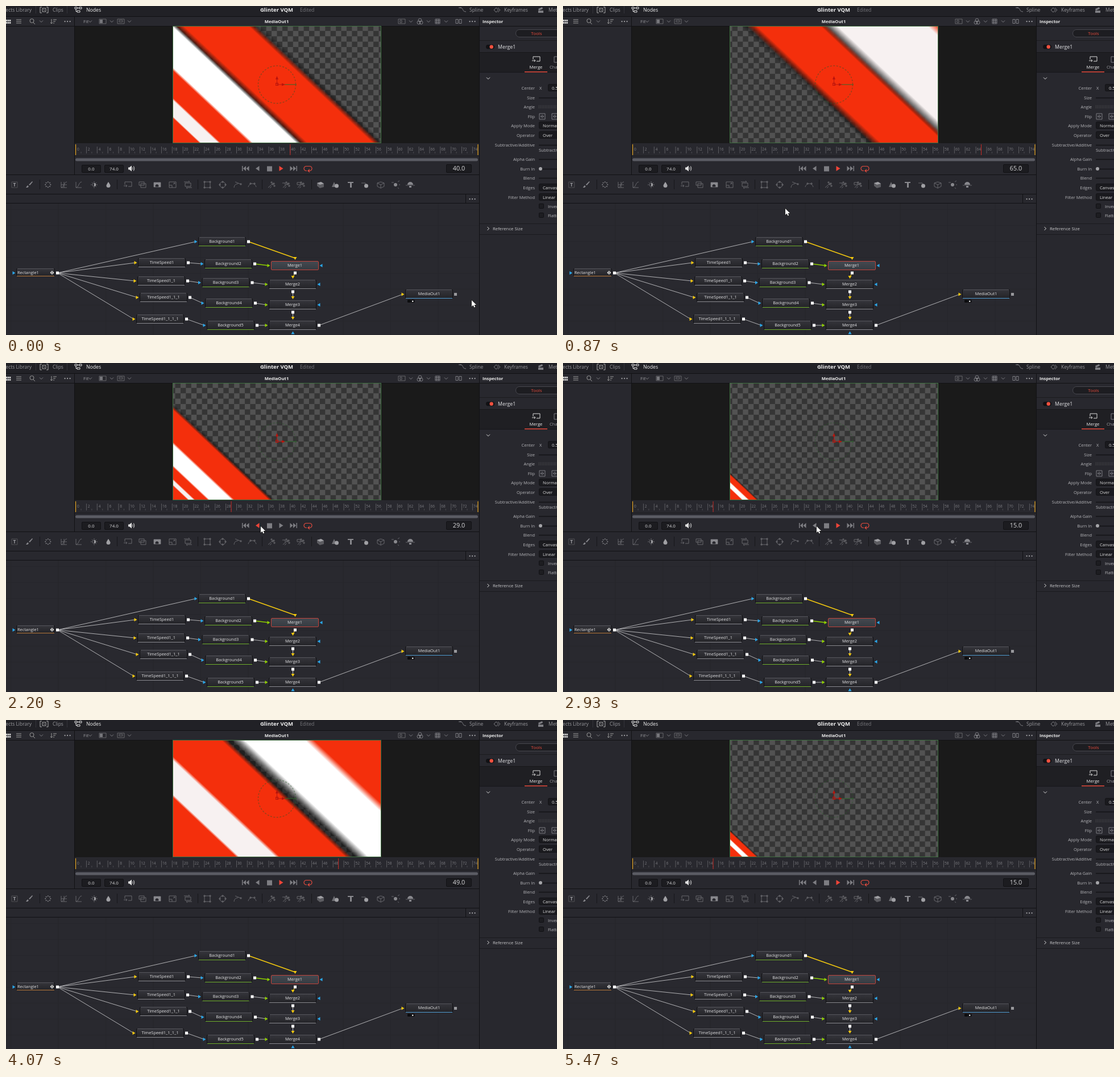
Animation of 969 by 578 pixels, one loop 5540 ms. Source, as an HTML page with a canvas:

```html
<!DOCTYPE html>
<html>
<head>
<meta charset="utf-8">
<style>
html, body { margin: 0; width: 100%; height: 100%; overflow: hidden; background: #28282e; }
canvas { display: block; }
</style>
</head>
<body>
<canvas id="stage" width="969" height="578"></canvas>
<script>
const ctx = document.getElementById('stage').getContext('2d');
const LOOP = 5540, STEP = 200 / 3, STEPS = 83;
const RED = '#e64b3d', GRAY = '#7d7d82', LIGHT = '#c4c4c6', PANEL = '#28282e', BLACK = '#111114';
const YELLOW = '#f2c80f', GREEN = '#8fcf00', BLUE = '#2ba6e8';
const VIEW = { x: 294, y: 36, w: 365, h: 204 };

// ---------- helpers ----------
const rect = (x, y, w, h, color) => { ctx.fillStyle = color; ctx.fillRect(x, y, w, h); };
function box(x, y, w, h, r, fill, stroke, width = 1) {
  ctx.beginPath();
  ctx.roundRect(x, y, w, h, r);
  if (fill) { ctx.fillStyle = fill; ctx.fill(); }
  if (stroke) { ctx.strokeStyle = stroke; ctx.lineWidth = width; ctx.stroke(); }
}
function text(s, x, y, size = 7.6, color = LIGHT, align = 'left', weight = 400) {
  ctx.font = `${weight} ${size}px "Open Sans", "Noto Sans", sans-serif`;
  ctx.textAlign = align;
  ctx.textBaseline = 'alphabetic';
  ctx.fillStyle = color;
  ctx.fillText(s, x, y + size * 0.36);
}
function line(x1, y1, x2, y2, color, width = 1) {
  ctx.strokeStyle = color;
  ctx.lineWidth = width;
  ctx.beginPath();
  ctx.moveTo(x1, y1);
  ctx.lineTo(x2, y2);
  ctx.stroke();
}
function icon(d, x, y, color = GRAY, filled = false, width = 1) {
  const path = new Path2D(d);
  ctx.save();
  ctx.translate(x, y);
  ctx.fillStyle = ctx.strokeStyle = color;
  ctx.lineWidth = width;
  filled ? ctx.fill(path) : ctx.stroke(path);
  ctx.restore();
}
const chevron = (x, y, color = GRAY) => icon('M-3 -1.5L0 1.5L3 -1.5', x, y, color);
const dots = (x, y) => [-4.5, 0, 4.5].forEach(d => box(x + d - 1, y - 1, 2.2, 2.2, 1, '#a0a0a4'));

// Piecewise linear curve through [input, output] pairs.
function curve(points, x) {
  if (x <= points[0][0]) return points[0][1];
  for (let i = 1; i < points.length; i++) {
    const [x0, y0] = points[i - 1], [x1, y1] = points[i];
    if (x <= x1) return y0 + (y1 - y0) * (x - x0) / (x1 - x0);
  }
  return points[points.length - 1][1];
}

// ---------- motion ----------
const RATE = 1.965;
const reversing = k => k >= 33 && k < 43;
function counter(k) {
  if (k <= 33) return Math.floor(40 + RATE * k) % 75;
  if (k < 42) return Math.floor(29.5 - RATE * (k - 33));
  return Math.floor(33.65 + RATE * (k - 53)) % 75;
}
const CURSOR_X = [[0, 819], [2, 745], [4, 600], [6, 440], [8, 308], [9, 330], [17, 452], [21, 452], [33, 448], [44, 446], [53, 430], [54, 415], [57, 270]];
const CURSOR_Y = [[0, 517], [2, 508], [6, 470], [8, 453], [9, 425], [17, 287], [44, 287], [52, 302], [53, 310], [54, 355], [57, 551]];
const cursorAt = k => k > 57 ? null : { x: curve(CURSOR_X, k), y: curve(CURSOR_Y, k) };

// Stripe edges, as distance along the bottom of the picture from its left corner.
const PICTURE_TIME = [[0, -4], [6, 0], [15, 12], [29, 29], [40, 40], [49, 51], [55, 58], [74, 79]];
const FRONT = [[-4, 16], [-2, 21], [0, 25], [5, 32], [8, 37], [12, 47], [15, 62], [19, 81], [22, 105], [26, 137], [29, 171], [33, 220], [37, 308], [40, 357], [44, 457], [51, 660]];
const TAIL = [[23, -20], [30, 46], [37, 150], [44, 332], [51, 438], [58, 560], [65, 660]];
const LAYERS = ['244,47,12', '255,255,255', '244,47,12', '247,241,241', '244,47,12'];

// ---------- viewer ----------
function band(rgb, alpha, tail, tailBlur, front, frontBlur) {
  const span = 640, slope = 0.94, { x, y, w, h } = VIEW;
  const reach = span / (1 + 1 / slope ** 2);
  const g = ctx.createLinearGradient(x, y + h, x + reach, y + h - reach / slope);
  const stop = (u, a) => g.addColorStop(Math.min(1, Math.max(0, u / span)), `rgba(${rgb},${a})`);
  stop(tail - tailBlur, 0);
  stop(tail + tailBlur, alpha);
  stop(front - frontBlur, alpha);
  stop(front + frontBlur, 0);
  rect(x, y, w, h, g);
}

function viewer(frame) {
  const { x, y, w, h } = VIEW, cell = 9.42;
  rect(121, 36, 711, 205, '#1a1a1a');
  ctx.save();
  ctx.beginPath();
  ctx.rect(x, y, w, h);
  ctx.clip();
  rect(x, y, w, h, '#353535');
  // Checkerboard centred on the picture.
  for (let r = -11; r < 11; r++)
    for (let c = -20; c < 20; c++)
      if ((r + c) % 2) rect(476.5 + c * cell, 138 + r * cell, cell, cell, '#525252');

  const time = curve(PICTURE_TIME, frame);
  const stripes = LAYERS.map((rgb, i) => {
    const age = time - 7 * i, front = curve(FRONT, age), tail = curve(TAIL, age);
    return { rgb, age, front, tail, fb: 1 + front / 65, tb: 2 + Math.max(0, tail) / 35 };
  }).filter(s => s.age >= -4);
  stripes.forEach(s => band('0,0,0', 0.7, s.tail - s.tb, s.tb, s.front + s.fb, s.fb * 1.5));
  stripes.forEach(s => band(s.rgb, 1, s.tail, s.tb, s.front, s.fb));
  ctx.restore();
  ctx.strokeStyle = '#3f7040';
  ctx.lineWidth = 1;
  ctx.strokeRect(x - 0.5, y - 0.5, w + 1, h + 1);

  ctx.setLineDash([3, 2.5]);
  ctx.strokeStyle = 'rgba(40,85,40,.45)';
  ctx.lineWidth = 1.5;
  ctx.beginPath();
  ctx.arc(476.5, 138, 33, 0, 7);
  ctx.stroke();
  ctx.setLineDash([]);
  line(490, 138, 511, 138, '#2c6b2c');
  line(476.5, 138, 476.5, 126, '#b8140c');
  line(476.5, 138, 488, 138, '#b8140c');
  icon('M-2.5 3L0 -3L2.5 3Z', 476.5, 126, '#b8140c', true);
  icon('M-3 -2.5L3 0L-3 2.5Z', 488, 138, '#b8140c', true);
  ctx.strokeStyle = '#b8140c';
  ctx.strokeRect(474.5, 135.5, 4, 4);
}

function ruler(frame) {
  rect(121, 241, 711, 55, PANEL);
  const tick = f => 122.6 + 9.43 * f;
  for (let f = 0; f <= 74; f++) {
    if (f % 2) line(tick(f), 256, tick(f), 259, '#4b4b50');
    else {
      line(tick(f), 247, tick(f), 259, '#5c5c61');
      text(f, tick(f) + (f < 10 ? 4.2 : 5.2), 252, 6.6, '#7c7c80', 'center');
    }
  }
  line(122.5, 243, 122.5, 262, '#d79a20', 1.3);
  line(830, 243, 830, 262, '#d79a20', 1.3);
  line(tick(frame), 243, tick(frame), 262, '#c92a25');
  line(121, 263.5, 832, 263.5, '#1c1c20');
  box(122, 267.5, 708, 5, 2.5, '#5b5c64');
}

function transport(frame, k) {
  const field = (x, y, w, h, s, size) => {
    box(x + 0.5, y + 0.5, w, h, 1.5, '#1c1c20', '#121215');
    text(s, x + w / 2 + 0.5, y + h / 2 + 0.5, size, '#d8d8da', 'center');
  };
  field(133, 279, 33, 13, '0.0', 8);
  field(173, 279, 33, 13, '74.0', 8);
  field(774, 278, 44, 14, frame.toFixed(1), 10.8);
  icon('M-5 -2H-3L1 -5V5L-3 2H-5Z', 220, 285.5, '#ddd', true);
  icon('M2.5 -2Q4 0 2.5 2M4.5 -4Q7 0 4.5 4', 220, 285.5, '#ddd');
  const back = reversing(k);
  icon('M-6 -4.5H-4.5V4.5H-6ZM1 -4.5V4.5L-4 0ZM6.5 -4.5V4.5L1.5 0Z', 421, 285.5, GRAY, true);
  icon('M3 -4.5V4.5L-3.5 0Z', 442.5, 285.5, back ? '#f04438' : GRAY, true);
  rect(459, 281.5, 9, 9, GRAY);
  icon('M-3 -4.5V4.5L4 0Z', 483.5, 285.5, back ? GRAY : '#f04438', true);
  icon('M6 -4.5H4.5V4.5H6ZM-1 -4.5V4.5L4 0ZM-6.5 -4.5V4.5L-1.5 0Z', 506, 285.5, GRAY, true);
  icon('M-2 4H-3A4 4 0 0 1 -3 -4H3A4 4 0 0 1 3 4H1M3 1.5L0 4L3 6.5', 531, 285.5, '#e24b3f', false, 1.2);
}

// ---------- panels ----------
const MERGE_ICON = 'M-5 0V-5H7V3H1M-7 2H-1M-3 0L-1 2L-3 4';
const FRAME_ICON = 'M-6 -4H6V4H-6Z';

function topBars() {
  rect(0, 0, 969, 18, '#212126');
  rect(0, 18, 969, 18, PANEL);
  text('Effects Library', 45, 7, 8.5, '#98989c', 'right');
  icon('M-7 -5H-4M-7 -5V5H-4M7 -5H4M7 -5V5H4M-3 -3H3V3H-3ZM-1 -1L1 1', 67, 7, '#aaa');
  text('Clips', 82, 7, 8.5, '#98989c');
  icon('M-6 -4H-2V-1H-6ZM2 -4H6V-1H2ZM-2 2H3V5H-2ZM-2 -2.5H2M-4 -1V3.5H-2', 127, 6, '#ddd');
  text('Nodes', 141, 7, 8.7, '#f0f0f0');
  text('Glinter VQM', 476, 7, 9.5, '#f0f0f0', 'center', 700);
  text('Edited', 517, 7, 8.6, '#77777c');
  icon('M-7 -3H-2M-5 -3C3 -3 -2 4 6 4', 803, 6);
  text('Spline', 815, 7, 8.5, '#98989c');
  icon('M-6 0L-2 -4L2 0L-2 4ZM1 -4L5 0L1 4', 864, 7);
  text('Keyframes', 876, 7, 8.5, '#98989c');
  icon('M-5 -2L2 -5L3 -2L-4 1ZM-5 1H4V5H-5Z', 941, 7, GRAY, true);
  text('Metadata', 954, 7, 8.5, '#98989c');
  for (const x of [52.5, 107.5]) line(x, 0, x, 13, '#34343a');
  line(0, 18.5, 969, 18.5, BLACK);

  for (const x of [0, 3, 6]) for (const y of [24, 28]) rect(x, y, 2.4, 3, '#ccc');
  icon('M-4 -3H5M-4 0H5M-4 3H5', 22, 27, '#999');
  icon('M2 2L5 5M3 -1A3.5 3.5 0 1 1 -4 -1A3.5 3.5 0 1 1 3 -1', 46, 27, '#999');
  chevron(62, 27);
  icon('M-3 -4V4M-5 2L-3 4L-1 2M0 -3H6M0 0H4M0 3H2', 83, 27, '#999');
  dots(108, 27);
  text('Fit', 136, 27, 8, '#98989c');
  chevron(148, 27);
  icon(FRAME_ICON, 170, 27, '#66666b');
  rect(165, 24, 5, 6, '#77777c');
  chevron(186, 27);
  icon('M-6 -4H6V4H-6ZM-3 -2H3V1H-3Z', 202, 27, '#66666b');
  chevron(217, 27);
  text('MediaOut1', 476, 27, 7.7, '#eee', 'center', 700);
  icon('M-6 -4H6V4H-6ZM-3 -2H0V2H-3Z', 696, 27, '#66666b');
  chevron(712, 27);
  icon('M3 -2A3 3 0 1 1 -3 -2A3 3 0 1 1 3 -2M1 2A3 3 0 1 1 -5 2A3 3 0 1 1 1 2M5 2A3 3 0 1 1 -1 2A3 3 0 1 1 5 2', 728, 27);
  chevron(743, 27);
  icon('M-4 -4H4V4H-4ZM-1.5 -4V4M1.5 -4V4M-4 -1.5H4M-4 1.5H4', 759, 27);
  chevron(774, 27);
  icon('M-5 -3.5H-1V3.5H-5ZM1 -3.5H5V3.5H1Z', 796, 27);
  dots(820, 27);
  line(0, 35.5, 969, 35.5, BLACK);
  line(120.5, 18, 120.5, 296, BLACK);
}

function toolbar() {
  rect(0, 296, 832, 51, PANEL);
  for (const y of [296.5, 330.5, 346.5]) line(0, y, 832, y, BLACK);
  for (const x of [59.5, 195.5, 337.5, 450.5, 537.5]) line(x, 305, x, 322, '#17171a');
  const dim = '#6e6e73', mid = '#88888d', bright = '#a0a0a4';
  const draw = (x, d, filled, color = dim) => icon(d, x, 314, color, filled, 0.9);
  const ring = 'M5 0A5 5 0 1 1 -5 0A5 5 0 1 1 5 0';
  const spark = 'M-6 5L1 -1M-3 6L0 3M-1 -5h2v2h-2zM3 -3h2v2h-2zM4 1h2v2h-2zM1 -2h2v2h-2z';
  icon('M-5 -5H5V5H-5Z', 15, 314, '#505055');
  text('T', 15, 314, 8.5, bright, 'center', 700);
  draw(41, 'M-6 5L-3 1L-1 3L-3 5ZM-1 0L5 -6L6 -5L1 1Z', true, mid);
  for (let i = 0; i < 8; i++) {
    const a = i * Math.PI / 4;
    rect(73 + 4.5 * Math.cos(a), 313 + 4.5 * Math.sin(a), 1.7, 1.7, mid);
  }
  draw(102, 'M-5 -5V5H5M-5 0H5M0 -5V5M-5 5C1 4 -1 -4 5 -5');
  draw(128, 'M-5 -5V5H5M-5 5C1 4 -1 -4 5 -5');
  draw(155, 'M3 0A3 3 0 1 1 -3 0A3 3 0 1 1 3 0M0 -6V-4M0 4V6M-6 0H-4M4 0H6M-4 -4L-3 -3M3 3L4 4M4 -4L3 -3');
  draw(155, 'M0 -3A3 3 0 0 1 0 3Z', true, bright);
  draw(180, 'M0 -5Q3.5 0 3.5 1.5A3.5 3.5 0 0 1 -3.5 1.5Q-3.5 0 0 -5Z', true, bright);
  draw(214, MERGE_ICON);
  draw(240, 'M-6 -5H3V1H-6ZM-3 -2H6V5H-3Z');
  draw(266, FRAME_ICON);
  draw(266, 'M-6 -4H6V4H2A3 3 0 1 0 -3 4H-6Z', true, mid);
  draw(293, 'M-6 -5H6V5H-6ZM-6 1H-1V5M1 -1L4 -3M2 -3H4V-1');
  draw(320, 'M-5 -3H5V3H-5ZM-7 -5H3M1 -7L3 -5M7 5H-3M-1 7L-3 5');
  draw(354, 'M-5 -5H5V5H-5ZM-6 -6h2v2h-2zM4 -6h2v2h-2zM-6 4h2v2h-2zM4 4h2v2h-2z');
  draw(381, ring + 'M-1 -6h2v2h-2zM-1 4h2v2h-2zM-6 -1h2v2h-2zM4 -1h2v2h-2z');
  draw(407, 'M-6 5C-5 -3 0 0 2 -3M-4 -5L6 -1M5 -2h2v2h-2z');
  draw(433, 'M-7 4C-5 -4 5 -4 7 4M-4 -3h2v2h-2zM3 -3h2v2h-2z');
  for (const x of [467, 493, 519]) draw(x, spark);
  draw(493, 'M-7 -3H-2V1');
  draw(519, 'M-7 -4H-1V0H-7Z');
  draw(553, 'M-6 -3L1 -5L6 -2V4L-1 6L-6 2Z', true, '#5c5c61');
  draw(553, 'M-6 -3L1 -5L6 -2L-1 0Z', true, bright);
  draw(579, 'M-6 4L-2 -5L2 4Z', true, dim);
  draw(579, 'M6 2A3.5 3.5 0 1 1 -1 2A3.5 3.5 0 1 1 6 2', true, bright);
  draw(606, 'M-5 -5H5V-3H2V5H-1V-3H-5Z', true, mid);
  draw(632, 'M-7 -3H0V1');
  draw(632, 'M5 2A3.5 3.5 0 1 1 -2 2A3.5 3.5 0 1 1 5 2', true, bright);
  draw(659, 'M-6 -3L0 -5L6 -3V3L0 6L-6 3ZM-6 -3L0 0L6 -3M0 0V6');
  draw(685, 'M-7 -4H-3M4 -5L7 -7M6 0H8M4 5L6 7');
  draw(685, 'M3 0A3 3 0 1 1 -3 0A3 3 0 1 1 3 0', true, mid);
  draw(711, 'M-5 0A5 5 0 0 1 5 0ZM-2 2H2V5H-2Z', true, mid);
  draw(711, 'M-8 1H8');
  dots(820, 339);
  line(808.5, 331, 808.5, 346, BLACK);
}

function inspector() {
  rect(833, 36, 136, 542, PANEL);
  rect(833, 82, 136, 35, '#1f1f23');
  text('Inspector', 838, 27, 7.7, '#eee', 'left', 700);
  box(896.5, 41.5, 90, 13, 6.5, '#1d1d21', '#47474d');
  text('Tools', 933, 48, 8, RED, 'center');
  line(833, 60.5, 969, 60.5, '#1b1b1f');
  box(844, 68, 15, 7.5, 3.7, '#111114');
  box(850.5, 68.5, 6.5, 6.5, 3.3, '#f0513f');
  text('Merge1', 865, 72, 8.8, '#e4e4e6');
  icon(MERGE_ICON, 932, 94, '#ddd');
  text('Merge', 932, 107, 7.7, '#eee', 'center');
  icon('M-3 -5V5H3M-3 -5H3', 967, 94);
  text('Channels', 956, 107, 7.7, '#98989c');
  line(833, 81.5, 969, 81.5, '#17171a');
  line(833, 116.5, 969, 116.5, '#17171a');
  rect(912, 115, 40, 1.5, RED);
  chevron(848, 127, '#ddd');
  const rows = { Center: 144, Size: 161, Angle: 177, Flip: 194, 'Apply Mode': 210, Operator: 227,
    'Subtractive/Additive': 244, 'Alpha Gain': 269, 'Burn In': 286, Blend: 302, Edges: 319, 'Filter Method': 336 };
  for (const name in rows) text(name, 930, rows[name], 7.5, '#b4b4b8', 'right');
  const field = (s, x, y) => {
    box(x + 0.5, y - 6.5, 60, 12, 2, '#1a1a1e', '#131316');
    text(s, x + 7, y, 7.6, '#ddd');
  };
  text('X', 938, 144, 7.5, '#b4b4b8');
  field('0.5', 953, 144);
  field('Normal', 937, 210);
  field('Over', 937, 227);
  field('Canvas', 937, 319);
  field('Linear', 937, 336);
  text('Subtractive', 937, 253, 7.5, '#b4b4b8');
  for (const y of [161, 244, 269, 286, 302]) line(937, y + 0.5, 969, y + 0.5, '#131316', 1.5);
  for (let x = 937; x < 969; x += 2.5) line(x, 174, x, 180, '#3c3c41');
  box(937, 283, 6, 6, 3, '#a5a5a9');
  for (const x of [943, 965]) icon('M-5 -5H5V5H-5ZM0 -3V3M-3 -1L-1 0L-3 1M3 -1L1 0L3 1', x, 194);
  [['Invert', 352], ['Flatten', 368]].forEach(([s, y]) => {
    box(937.5, y - 4.5, 8, 8, 1, '#1d1d21', '#101013');
    text(s, 953, y, 7.5, '#b4b4b8');
  });
  line(833, 382.5, 969, 382.5, '#1a1a1e');
  icon('M-1.5 -3L1.5 0L-1.5 3', 848, 391, '#ddd');
  text('Reference Size', 856, 391, 7.8, '#c8c8ca');
  line(833, 401.5, 969, 401.5, '#1a1a1e');
  line(832.5, 18, 832.5, 578, BLACK);
}

// ---------- node graph ----------
const node = (name, x, y, accent, w = 84) => ({ name, x, y, accent, w });
const source = node('Rectangle1', 18, 469, '#b9793a', 68);
const speeds = [[232, 451], [231, 483], [235, 512], [229, 550]]
  .map(([x, y], i) => node('TimeSpeed1' + '_1'.repeat(i), x, y, '#8a8a90'));
const backgrounds = [[338, 414], [349, 453], [344.5, 486], [350, 522], [353, 561]]
  .map(([x, y], i) => node('Background' + (i + 1), x, y, '#6fae2c'));
const merges = [[466, 456], [462, 489], [462, 525], [462, 561]]
  .map(([x, y], i) => node('Merge' + (i + 1), x, y, '#8a8a90'));
const output = node('MediaOut1', 702, 506.5, '#4f9bd0');
const nodes = [source, ...speeds, ...backgrounds, ...merges, output];
const selected = merges[0];
merges.slice(0, 3).forEach(m => m.below = true);

const links = [{ from: source, to: backgrounds[0], color: BLUE }];
speeds.forEach((s, i) => links.push(
  { from: source, to: s, color: YELLOW },
  { from: s, to: backgrounds[i + 1], color: BLUE },
  { from: backgrounds[i + 1], to: merges[i], color: GREEN }));
[backgrounds[0], ...merges.slice(0, 3)].forEach((n, i) =>
  links.push({ from: n, to: merges[i], color: YELLOW, top: true }));
links.push({ from: merges[3], to: output, color: YELLOW });

const outlet = n => n.below ? [n.x + 42.5, n.y + 13] : [n.x + n.w + 4.5, n.y];
const inlet = l => l.top ? [l.to.x + 42.5, l.to.y - 13] : [l.to.x - 4.5, l.to.y];

function drawNode(n, hovered) {
  const { x, y, w } = n, h = n === source ? 13 : 15, top = Math.floor(y) - 7.5;
  const g = ctx.createLinearGradient(0, top, 0, top + h);
  g.addColorStop(0, n === selected ? '#444950' : '#35353b');
  g.addColorStop(1, n === selected ? '#363b41' : '#242428');
  box(x + 0.5, top, w - 1, h, 1.5, g, n === selected ? '#c2433b' : '#101013');
  if (n !== selected) {
    line(x + 2, top, x + w - 2, top, '#55555b');
    line(x + 1, top + h, x + w - 1, top + h, n.accent);
  }
  if (n === source) {
    text(n.name, 20, y - 1, 7.4, '#e2e2e4');
    icon('M0 -3.5L3.5 0L0 3.5L-3.5 0Z', 81, 468.5, '#ddd', true);
    line(81, 466.5, 81, 470.5, '#222');
  } else text(n.name, x + w / 2, y - 1, 7.4, '#e2e2e4', 'center');
  if (hovered || n === output) {
    box(x + 4, y + 9.5, 6, 5, 1, '#0c0c0e');
    box(x + 10.5, y + 9.5, 6, 5, 1, '#0c0c0e');
    if (n === output) box(x + 12, y + 11, 2.5, 2.5, 1.2, '#fff');
  }
}

function graph(cursor) {
  rect(0, 347, 832, 231, '#29292f');
  for (let x = 8; x < 832; x += 83.5) line(x + 0.5, 347, x + 0.5, 578, '#26262b');
  for (let y = 357; y < 578; y += 28) line(0, y + 0.5, 832, y + 0.5, '#26262b');
  const hot = cursor && nodes.find(n =>
    cursor.x > n.x && cursor.x < n.x + n.w && cursor.y > n.y - 8 && cursor.y < n.y + 8);
  for (const l of links) {
    const lit = [l.from, l.to].some(n => n === hot || n === selected);
    line(...outlet(l.from), ...inlet(l), lit ? l.color : '#c0c0c2', lit ? 1.6 : 0.9);
  }
  // The chain of merges hangs below each output square.
  merges.slice(0, 3).forEach((m, i) => {
    const next = merges[i + 1];
    line(...outlet(m), next.x + 42.5, next.y - 13, m === selected || m === hot ? YELLOW : '#c0c0c2');
  });
  nodes.forEach(n => drawNode(n, n === hot));
  const right = 'M-2 -3L3 0L-2 3Z', left = 'M2 -3L-3 0L2 3Z', down = 'M-3 -2L0 3L3 -2Z';
  for (const l of links) if (!l.top) icon(right, ...inlet(l), l.color, true);
  for (const m of merges) icon(down, m.x + 42.5, m.y - 13, YELLOW, true);
  icon(right, 13.5, 469, BLUE, true);
  merges.slice(0, 3).forEach(m => icon(left, m.x + 88.5, m.y, BLUE, true));
  icon('M-3 2L0 -3L3 2Z', 504.5, 574.5, BLUE, true);
  for (const n of nodes) {
    const [x, y] = outlet(n);
    rect(x - 2.5, y - 2.5, 5, 5, n === output ? '#98989c' : '#fff');
  }
}

// ---------- loop ----------
function render(k) {
  const frame = counter(k), cursor = cursorAt(k);
  rect(0, 0, 969, 578, PANEL);
  topBars();
  viewer(frame);
  ruler(frame);
  transport(frame, k);
  toolbar();
  graph(cursor);
  inspector();
  if (cursor) {
    const arrow = 'M0 0V11L2.6 8.6L4.4 12.6L6.2 11.8L4.5 8H8Z';
    icon(arrow, cursor.x, cursor.y, '#222', false, 1.4);
    icon(arrow, cursor.x, cursor.y, '#fff', true);
  }
}
// The merge chain is drawn on its own, so only the first top input stays a link.
const chain = links.filter(l => l.top && l.from !== backgrounds[0]);
chain.forEach(l => links.splice(links.indexOf(l), 1));

let shown = -1;
function tick() {
  const k = Math.min(STEPS - 1, Math.floor((performance.now() % LOOP + 4) / STEP));
  if (k !== shown) render(shown = k);
  requestAnimationFrame(tick);
}
tick();
</script>
</body>
</html>
```
